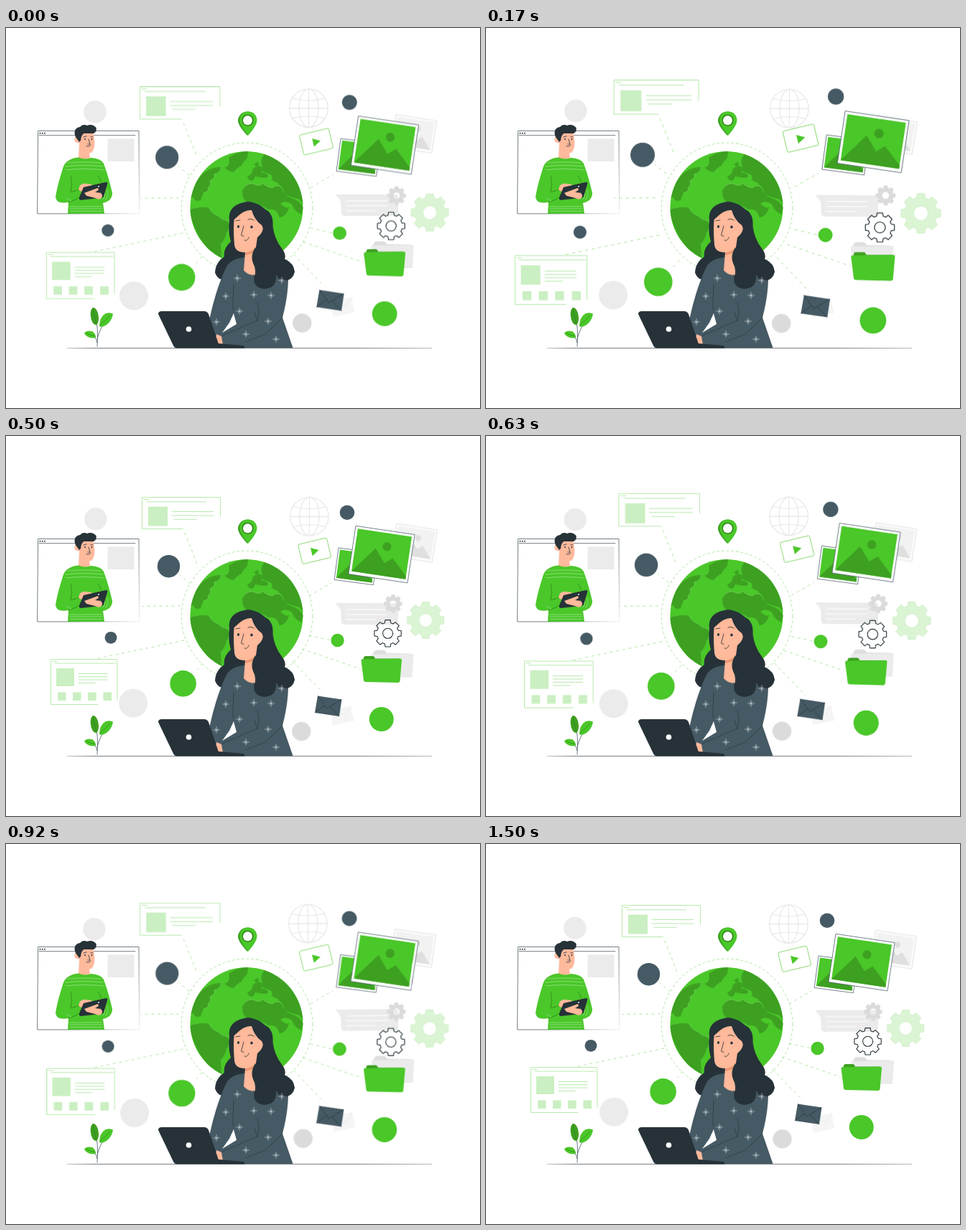
An HTML page that plays this animation: 660 by 530 pixels, repeating every 1540 ms.

```html
<!DOCTYPE html>
<html lang="en">
<head>
<meta charset="utf-8">
<title>Connected world</title>
<style>
html, body { margin: 0; width: 100%; height: 100%; overflow: hidden; background: #fff; }
svg { display: block; width: 660px; height: 530px; }
#sway { transform-origin: 330px 247px; }
#beat { transform-origin: 329px 240px; }
.g { fill: #4ac729; }
.d { fill: #3da021; }
.n { fill: #455a64; }
.k { fill: #263238; }
.s { fill: #ffb99b; }
.p { fill: #caefc2; }
.e { fill: #ebebeb; }
.l { fill: none; stroke-linecap: round; stroke-linejoin: round; }
.frame { stroke: #9be08c; stroke-width: .7; }
.ink { stroke: #263238; stroke-width: .8; }
.dash { stroke: #92dc82; stroke-width: .7; stroke-dasharray: 4 4.5; stroke-linecap: butt; }
</style>
</head>
<body>
<svg viewBox="0 0 660 530">
  <defs>
    <linearGradient id="fade" gradientUnits="userSpaceOnUse" x1="44" y1="143" x2="185" y2="259">
      <stop offset=".6" stop-color="#37474f"/><stop offset="1" stop-color="#37474f" stop-opacity=".1"/>
    </linearGradient>
    <linearGradient id="ground" gradientUnits="userSpaceOnUse" x1="85" y1="0" x2="593" y2="0">
      <stop offset="0" stop-color="#c4c8ca"/><stop offset=".07" stop-color="#788287"/>
      <stop offset=".8" stop-color="#788287"/><stop offset="1" stop-color="#b4babd"/>
    </linearGradient>
    <clipPath id="disc"><circle cx="335" cy="250.500" r="78.500"/></clipPath>
  </defs>

  <g id="sway">
    <g class="l" stroke="#e6e6e6" stroke-width="1.200">
      <circle cx="421.500" cy="111.800" r="26.800"/>
      <ellipse cx="421.500" cy="111.800" rx="13.500" ry="26.800"/>
      <path d="M421.500 85V138.600M394.700 111.800H448.300M399 98Q421.500 104 444 98M399 126Q421.500 120 444 126"/>
    </g>
    <circle class="e" cx="124" cy="117" r="15.700"/>
    <circle class="e" cx="178" cy="373.500" r="20"/>
    <circle cx="412.300" cy="411.500" r="13.200" fill="#dbdbdb"/>
    <g transform="translate(543 120.500) rotate(8.700)">
      <path d="M0 0H57.500V46H0Z" fill="#fbfbfb" stroke="#dedede" stroke-width=".8"/>
      <path d="M3 3H54.500V42H3Z" fill="#f2f2f2"/>
      <path d="M3 42L23 18 34 31 41 25 54.500 42Z" fill="#dfdfdf"/>
      <circle cx="33" cy="15.500" r="4.200" fill="#dfdfdf"/>
    </g>
    <path class="e" d="M458 232H542Q546 232 546 236V257Q546 262 541 262H472Q466.500 262 466.500 256V246Q466 239 458 232Z"/>
    <path class="l" stroke="#fff" stroke-width="1.200" d="M474 241H531M474 248H531M474 255H514"/>
    <path fill="#dedede" d="M511 303L513 299Q514 297.500 516 297.500H526Q529 298 530 301.500L564 302V335H511Z"/>
    <path class="e" d="M508 303.500L568 302.500 566 335 512 333Z"/>
    <path fill="#f5f5f5" d="M454 381L481 375.500 485.500 396.500 455 403Z"/>
    <path class="l" stroke="#ebebeb" d="M455 381L473 389 481 376"/>
  </g>

  <g id="scene">
    <path class="l" stroke="url(#ground)" d="M85 446.500H593"/>

    <circle class="l" cx="335.600" cy="251.300" r="91.300" stroke="#8fdb7e" stroke-width=".7" stroke-dasharray="3 3.700"/>
    <circle class="g" cx="335" cy="250.500" r="78.500"/>
    <g class="d" clip-path="url(#disc)">
      <path d="M310 181Q322 172 337 172L336 181Q330 187 328 192 322 194 317 201 309 200 305 195 313 191 310 181Z"/>
      <path d="M271 206Q284 193 300 194 299 202 290 204 292 210 284 213 287 219 281 223 284 228 275 230L271 240Q264 244 260 235L256 240Q260 218 271 206Z"/>
      <path d="M255 254Q270 248 283 251 286 259 296 262 299 267 309 269 314 278 307 287 304 297 299 301L300 325Q265 300 255 254Z"/>
      <path d="M329 226Q333 216 345 217 350 222 358 217 363 222 371 223 377 217 383 222 387 232 396 237 409 240 414 251L411 260Q401 255 398 246 388 239 382 245 388 252 394 250 391 263 381 264 377 251 365 253 354 245 340 247 328 240 329 226Z"/>
      <path d="M336 207Q344 204 343 198 350 189 357 194L355 201 364 204Q367 209 359 209L347 207 344 213Q338 214 336 207ZM345 191L349 187 353 189 349 193Z"/>
      <path d="M360 176Q353 184 357 193L356 200 365 203Q373 205 370 212L378 216 385 223 388 231 397 236 409 239 416 250V176Z"/>
    </g>
    <path class="l" stroke="#74d15d" stroke-width=".7" d="M300 194Q298 202 290 204 292 210 284 213 287 219 281 223 284 228 275 230M283 251Q286 259 296 262 299 267 309 269 314 278 307 287M329 226Q333 216 345 217 350 222 358 217 363 222 371 223 377 217 383 222"/>

    <path class="d" d="M336 150Q323 136 323 129A13 13 0 0 1 336 116.500Q349 117 349 129 349 136 336 150Z"/>
    <path class="g" d="M337 150Q326 136 325.500 129A12 12 0 0 1 337 116.500 12.500 12.500 0 0 1 349.500 129Q349 137 337 150Z"/>
    <circle cx="336.500" cy="128.800" r="7.300" fill="#fff" stroke="#318619" stroke-width="1.500"/>

    <path class="l" stroke="url(#fade)" stroke-width=".7" d="M45 143.500H185L185.500 259H44ZM46 149.700H180"/>
    <g class="k"><circle cx="47.500" cy="146.700" r="1"/><circle cx="50.700" cy="146.700" r="1"/><circle cx="53.900" cy="146.700" r="1"/></g>
    <path class="e" d="M141.500 154.500H178.500V186H141.500Z"/>
    <g id="man">
      <path class="s" d="M101 151L107 144 122 147 123.500 160Q123 174 116 174.500L117 182Q108 186 101 181L102 160Q95 161 95.500 155 96 150 101 151Z"/>
      <path class="k" d="M102 159L97 152Q94 146 97 141 100 138 103 138 107 133 113 136 120 133 125.500 139 127 144 122 147L108 147 105 151 104 157Z"/>
      <path class="g" d="M101 180.500Q110 184 119 181 132 182 136 189 143 208 148 230 148 241 135 244L137 259H86L87 243Q70 246 69 236 71 221 80 193 85 182 101 180.500Z"/>
      <path class="l" stroke="#a3e494" stroke-width=".7" d="M86 188Q108 186 132 188M83 193Q108 190 135 193M83 198Q108 195 137 198M89 252H134M89 255.500H134M88 249H133M137 229Q139 235 135 239M141 226Q144 234 138 240M84 237L92 242"/>
      <path class="l" stroke="#2d7c19" stroke-width=".7" d="M90 206Q93 215 90 229L104 225M87 243Q92 242 101 237M129 207L133 215"/>
      <path class="s" d="M101 226Q102 217 109 217L119 218 122 223 109 230Z"/>
      <path class="k" d="M108 222L139 215Q142 215 141 218L136 235Q135 237 132 237L104 240Q101 239 102 236Z"/>
      <path class="s" d="M109 230L120 226 128 223 129 226 124 229 132 230Q137 236 130 239L120 236 112 234Z"/>
      <circle cx="129" cy="221" r=".9" fill="#fff"/>
      <path class="l ink" d="M108 152L112 151M118 151.500L121 152M115 155L117 162H114M112 165Q115 166 118 163"/>
      <circle class="k" cx="110" cy="155" r="1"/><circle class="k" cx="119.500" cy="155" r="1"/>
    </g>

    <g id="woman">
      <path class="k" d="M311 268Q308 246 337 242 359 245 368 263L365 350H314Q296 356 291 341 292 326 304 319 302 308 313 298 309 285 311 268Z"/>
      <path class="n" d="M331 320Q311 322 305 337 292 366 284 403L279 421Q284 431 300 430L295 446H399.500L385 404Q393 373 393 349 388 329 350 319Z"/>
      <path fill="#fff" d="M317 398L321 413 301 425 311 411Z"/>
      <path class="l" stroke="#2f3e46" stroke-width=".8" d="M317 357Q316 377 316 394M350 383Q354 397 350 408L301 429M385 404L361 427 334 438M350 408L346 397"/>
      <path class="s" d="M318 263Q328 252 342 254L357 271Q362 282 350 292L348 306 347 344Q338 346 331 338L333 313Q319 313 318 302 316 280 318 263Z"/>
      <path fill="#ed9973" d="M333 313Q341 312 348 306V312Q341 316 333 317Z"/>
      <path class="k" d="M326 253Q344 244 358 252 373 256 371.500 277 374 294 383 306 391 316 388 322 401 328 402 340 400 351 388 353 380 352 376 344 378 363 359 364 345 362 345 349 350 339 344 328 340 318 346 308 354 300 351 292 361 282 356 275 346 268 342 254 332 253 320 265 315 271 318 259 326 253Z"/>
      <path class="l ink" d="M320 269L326 268M337 267Q341 265 345 268M331 276L327.500 289 331 290.500M332 296Q336 298 338 292"/>
      <ellipse class="k" cx="323.500" cy="277" rx="1.500" ry="2"/><ellipse class="k" cx="342" cy="277.500" rx="1.700" ry="2"/>
      <g id="stars" class="l" stroke="#d3dbde" stroke-width=".6"></g>
      <path class="s" d="M293 427L300 430 302 441H293Z"/>
    </g>

    <path class="k" d="M212 399Q212 395 217 395H276Q280 395 282 399L298 446.500H237Q234 446 233 443ZM296 440L331 443 333 446.500H290Z"/>
    <circle cx="254.500" cy="420" r="3.800" fill="#fff"/>

    <path class="l" stroke="#455a64" stroke-width=".8" d="M127 444Q129 420 124 397M127 434Q130 419 142 404M127 439Q125 428 115 426"/>
    <ellipse class="d" cx="123.300" cy="402" rx="5.500" ry="12.200" transform="rotate(-8 123.300 402)"/>
    <path class="g" d="M130 416Q130 403 139 398 147 396 149 399 147 409 140 414 134 418 130 416Z"/>
    <path class="g" d="M109 426Q111 421 120 423 125 426 125 432 114 434 109 426Z"/>
    <path class="l" stroke="#2d7c19" stroke-width=".6" d="M121.500 393L125 412M131 415L145 401M112 426L124 430"/>
  </g>

  <g id="beat">
    <path class="l dash" d="M266 178L247 130M257 206L242 194M243 237L190 237.500M248 285L124 311M274 317L263 329M422 223L453 205M422 278L454 285.500M412 297L494 325M399 314L441 358"/>

    <path class="l frame" d="M246 129.500H189.500V85.500H298.500V112M196 91.800H279M231 105.500H289M231 111H289M234 116.300H265M192 88.500H199"/>
    <path class="p" d="M198 98.500H225V125.500H198Z"/>
    <path class="l frame" d="M128 374.500H62.500V311.500H155V368M68 317H153M101 331.500H141M101 335.800H141M101 340H141M101 344.500H124M65 314.300H71"/>
    <path class="p" d="M70 324H95V349H70ZM72 357.500h11.500v11.500h-11.500zM93 357.500h11.500v11.500h-11.500zM114 357.500h11.500v11.500h-11.500zM135.500 357.500h11.500v11.500h-11.500z"/>

    <g class="n"><circle cx="226.500" cy="181.700" r="15.700"/><circle cx="146" cy="281.300" r="8.400"/><circle cx="475" cy="106.700" r="10.300"/></g>
    <g class="g"><circle cx="246.600" cy="345.300" r="18.300"/><circle cx="461.600" cy="285" r="9.200"/><circle cx="522.800" cy="395" r="17"/></g>

    <g transform="translate(406.500 151.500) rotate(-13.500)">
      <path d="M2 0H39Q41 0 41 2V26Q41 28 39 28H2Q0 28 0 26V2Q0 0 2 0Z" fill="#fff" stroke="#4ac729" stroke-width=".6"/>
      <path class="g" d="M16 8.500L26.500 14.200 16 20Z"/>
    </g>

    <g id="photos"></g>
    <g id="gears"></g>

    <path class="d" d="M497 313L498.500 308Q499 307 501 307H511Q513 307 514 310.500H548V320H497Z"/>
    <path class="g" d="M496 311.200L549 310.500Q551.500 310.500 551 313L548.500 342Q548 344 546 344L501 343Q498.500 343 498 341L494.500 313Q494.500 311.200 496 311.200Z"/>
    <path class="n" d="M434 362.500L467.500 367.500 464 391 430 386Z"/>
    <path class="l ink" stroke-opacity=".7" d="M434 362.500L447 380 467 367.500M430 386L444 376M464 391L451 377.500"/>
  </g>
</svg>
<script>
const LOOP = 1540;
const add = (id, html) => document.getElementById(id).innerHTML += html;

const star = (x, y, r = 4.5) => [0, 45, 90, 135].map(a => {
  const k = a % 90 ? r * .6 : r;
  return `<path d="M${-k} 0H${k}" transform="translate(${x} ${y}) rotate(${a})"/>`;
}).join('');

const photo = (x, y, turn, size) => `
  <g transform="translate(${x} ${y}) rotate(${turn}) scale(${size})">
    <path d="M0 0H83V68H0Z" fill="#fff" stroke="#455a64" stroke-width="${.7 / size}"/>
    <path class="g" d="M3.500 3.500H79.500V63.500H3.500Z"/>
    <path class="d" d="M3.500 63.500L32 27 47 45.500 57.500 37 79.500 59V63.500Z"/>
    <circle class="d" cx="47.300" cy="22.300" r="6"/>
  </g>`;

// Eight teeth with slanted sides around a hub
function gear(x, y, r, hub, style) {
  const inner = r * .8, pts = [];
  for (let i = 0; i < 8; i++) {
    for (const [da, rad] of [[-.28, inner], [-.19, r], [.19, r], [.28, inner]]) {
      const a = i * Math.PI / 4 + da;
      pts.push(`${(x + rad * Math.cos(a)).toFixed(2)} ${(y + rad * Math.sin(a)).toFixed(2)}`);
    }
  }
  const hole = `M${x - hub} ${y}a${hub} ${hub} 0 1 0 ${2 * hub} 0a${hub} ${hub} 0 1 0 ${-2 * hub} 0Z`;
  return `<path fill-rule="evenodd" stroke-linejoin="round" d="M${pts.join('L')}Z${hole}" ${style}/>`;
}

const stars = [[322, 349], [384, 352], [345, 372], [369, 373], [306, 374],
  [325, 395], [293, 410], [365, 409], [334, 427], [376, 434]];
add('stars', stars.map(([x, y]) => star(x, y)).join(''));
add('photos', photo(463, 156, 7.5, .66) + photo(487, 125.3, 8.5, 1));
add('gears',
  gear(539, 234, 13, 4.5, 'fill="#dbdbdb"') +
  gear(584.3, 257, 26, 9.3, 'fill="#daf4d4" stroke="#c5edbb" stroke-width=".6"') +
  gear(531.6, 275.3, 19, 7, 'fill="none" stroke="#263238" stroke-width="1.100"'));

// Rows of [ms, value]
const beat = [[0, .26], [45, .45], [170, .96], [215, 1.1], [260, .9], [330, .31], [425, 0],
  [555, 0], [630, .38], [710, 1], [790, .64], [920, .25], [1070, 0], [1540, 0]];
const sway = [[0, 0], [170, .37], [350, .78], [500, .36], [570, .25], [630, .1],
  [790, -.32], [1080, -.75], [1190, -.75], [1540, 0]];

const play = (id, rows, pose) => document.getElementById(id).animate(
  rows.map(([ms, v]) => ({ offset: ms / LOOP, transform: pose(v) })),
  { duration: LOOP, iterations: Infinity });

play('beat', beat, v => `scale(${1 + v * .086})`);
play('sway', sway, v => `rotate(${v}deg)`);
</script>
</body>
</html>
```
